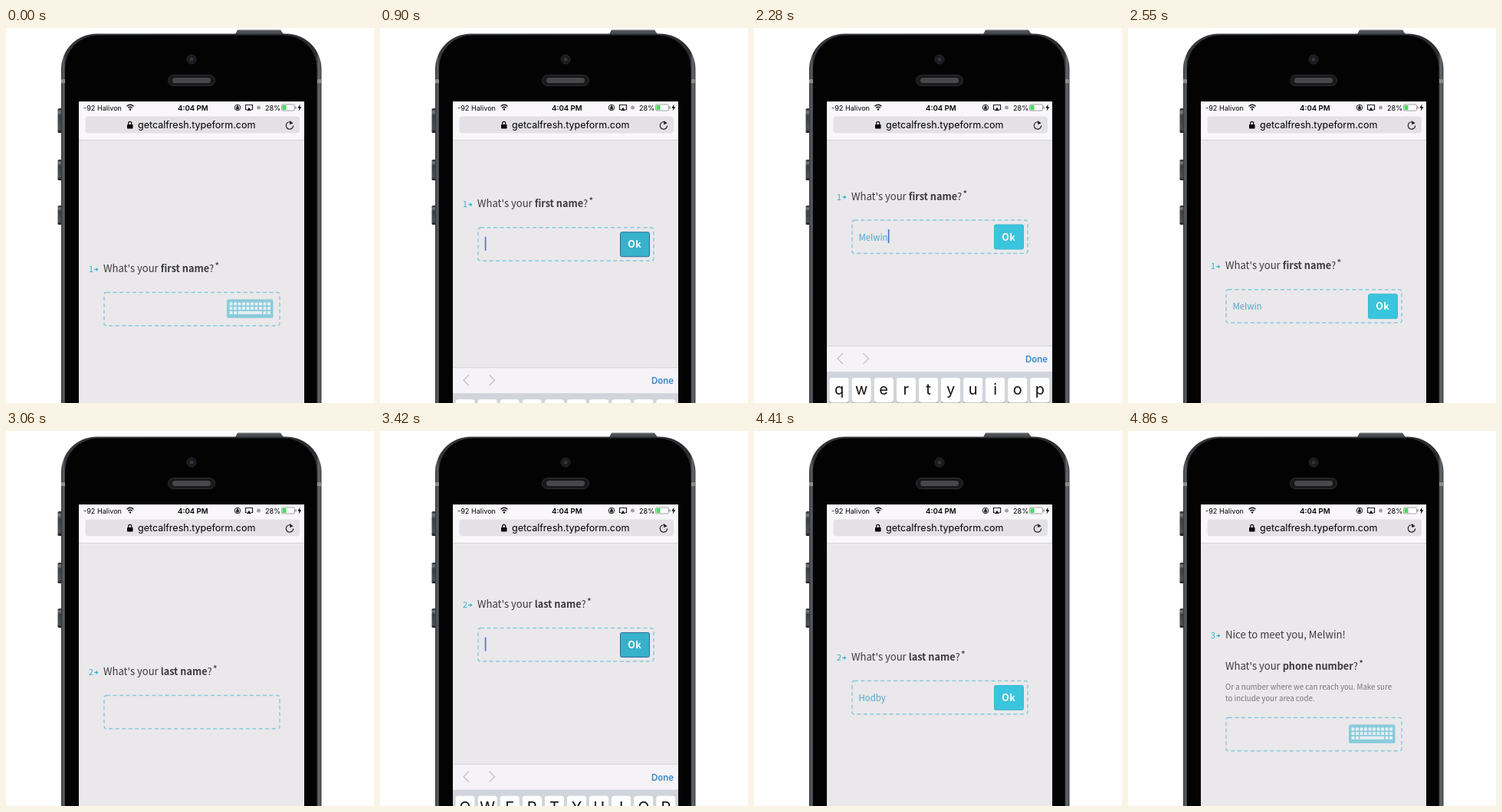
Write an HTML page that moves like this. It is 480 px wide and 490 px high and loops after 4.89 s.

```html
<!DOCTYPE html>
<html lang="en">
<head>
<meta charset="utf-8">
<title>Mobile form</title>
<style>
  html, body { margin: 0; width: 100%; height: 100%; overflow: hidden; background: #fff; }
  svg { display: block; width: 480px; height: 490px; }
  text { font-family: Inter, "Liberation Sans", sans-serif; white-space: pre; }
  .form text { font-family: "Noto Sans CJK JP", "Noto Sans CJK SC", "Noto Sans CJK", "Noto Sans", sans-serif; }
  .title { font-size: 13.1px; fill: #3b3a3d; }
  .title .strong { font-size: 12.7px; font-weight: 600; }
  .hint { font-size: 9.7px; fill: #77757a; }
  .num { font-size: 10.8px; fill: #35b0ca; }
  .entry { font-size: 11.4px; fill: #4ba9cb; }
  .ok { font-size: 12.4px; font-weight: 700; fill: #fff; letter-spacing: .5px; text-anchor: middle; }
  .key { font-size: 20px; fill: #111; text-anchor: middle; }
</style>
</head>
<body>
<svg viewBox="0 0 480 490">
  <defs>
    <linearGradient id="edge">
      <stop offset="0" stop-color="#2e3135"/>
      <stop offset=".008" stop-color="#5d6166"/>
      <stop offset=".016" stop-color="#33363a"/>
      <stop offset=".98" stop-color="#2b2d31"/>
      <stop offset=".99" stop-color="#686b70"/>
      <stop offset="1" stop-color="#3a3d41"/>
    </linearGradient>
    <linearGradient id="metal" x2="0" y2="1">
      <stop offset="0" stop-color="#26282b"/>
      <stop offset=".15" stop-color="#777a7f"/>
      <stop offset=".3" stop-color="#3b3e42"/>
      <stop offset=".85" stop-color="#4d5054"/>
      <stop offset="1" stop-color="#151618"/>
    </linearGradient>
    <clipPath id="screen"><rect x="95" y="96" width="294" height="394"/></clipPath>
    <clipPath id="page"><rect x="95" y="147" width="294" height="343"/></clipPath>
  </defs>

  <g id="phone">
    <path d="M299 8L302 2.5H358L362 8Z" fill="#4b4e52"/>
    <path d="M303 3H357" stroke="#85888c"/>
    <g fill="url(#metal)">
      <rect x="67.5" y="105" width="7" height="32" rx="1.5"/>
      <rect x="67.5" y="172" width="7" height="27" rx="1.5"/>
      <rect x="67.5" y="232" width="7" height="25" rx="1.5"/>
    </g>
    <rect x="72" y="7.5" width="339.5" height="600" rx="46" fill="url(#edge)"/>
    <path d="M72 67h5v5h-5zM406 67h5.5v5H406z" fill="#8b8d90"/>
    <rect x="77" y="9.5" width="328.5" height="600" rx="43" fill="#030304"/>
    <circle cx="242" cy="41" r="6" fill="#1a1a1d" stroke="#29292c"/>
    <circle cx="242" cy="41" r="2.6" fill="#34343c"/>
    <rect x="211.5" y="61.5" width="61" height="14" rx="7" fill="#19191b" stroke="#303033"/>
    <rect x="217" y="65" width="50" height="7" rx="3.5" fill="#48484b"/>
  </g>

  <rect x="95" y="96" width="294" height="394" fill="#eae8eb"/>
  <g id="form" class="form" clip-path="url(#page)"></g>

  <g id="chrome">
    <rect x="95" y="96" width="294" height="50.5" fill="#f9f7fa"/>
    <path d="M95 146.5H389" stroke="#d5d3d7"/>
    <text x="101" y="107.5" font-size="9.1">-92 Halivon</text>
    <g fill="none" stroke="#111" stroke-width="1.4">
      <path d="M157.5 102.2Q162 98.4 166.500 102.2M159.300 104.400Q162 102.100 164.700 104.400"/>
    </g>
    <circle cx="162" cy="106.400" r="1.200"/>
    <text x="224" y="107.500" font-size="9.600" font-weight="600">4:04 PM</text>
    <circle cx="302" cy="104" r="3.800" fill="none" stroke="#222"/>
    <path d="M300.300 103.500h3.400v2.700h-3.400zM301 103.500v-1a1 1 0 0 1 2 0v1" fill="#222" stroke="#222" stroke-width=".5"/>
    <path d="M314 106.500H312.500V100.500H321.500V106.500H320" fill="none" stroke="#222" stroke-width="1.200"/>
    <path d="M317 103.800L320.300 108H313.700Z" fill="#222"/>
    <circle cx="329.500" cy="104" r="2.500" fill="#a3a1a6"/>
    <text x="338" y="107.500" font-size="9.100">28%</text>
    <rect x="359.500" y="100" width="17" height="8" rx="1.500" fill="#fff" stroke="#8c8b90" stroke-width=".8"/>
    <rect x="360.500" y="101" width="5" height="6" fill="#4cd964"/>
    <path d="M378 102.500v3" stroke="#8c8b90" stroke-width="1.400"/>
    <path d="M383.700 99.500L380.500 104.500H382.600L381.700 108.500L385.300 103.300H383.100Z"/>

    <rect x="103.500" y="115.500" width="279.500" height="22" rx="4" fill="#e3e1e5"/>
    <rect x="158" y="126" width="7.500" height="5.500" rx=".8"/>
    <path d="M159.700 126V124.300a2 2 0 0 1 4 0V126" fill="none" stroke="#000" stroke-width="1.200"/>
    <text x="172" y="131" font-size="12.500">getcalfresh.typeform.com</text>
    <path d="M373.400 124.200A4.700 4.700 0 1 0 374.700 127.500" fill="none" stroke="#222" stroke-width="1.200"/>
    <path d="M370.200 121L374.600 124.400L370.200 126.300Z" fill="#222"/>
  </g>

  <g clip-path="url(#screen)"><g id="keyboard"></g></g>
</svg>

<script>
const LOOP = 4890;
const LIFT = 94.5;        // page rise while the keyboard is open
const KEYBOARD = 205;     // keyboard travel
const PAGE = 350;         // distance between questions
const ROW = 'qwertyuiop';
const $ = id => document.getElementById(id);

// Each question: when it is focused, typed into, confirmed and left.
const questions = [
  { label: 'first name', enter: null, icon: -100, focus: 640, rise: 710, dur: 360,
    text: 'Melwin', keys: [1300, 1480, 1640, 1780, 1920, 2060],
    press: 2210, drop: 2340, leave: 2610 },
  { label: 'last name', enter: 2610, icon: null, focus: 3210, rise: 3220, dur: 340,
    text: 'Hodby', keys: [3590, 3680, 3760, 3830, 3900],
    press: 4140, drop: 4240, leave: 4450 },
  { label: 'phone number', enter: 4450, icon: 4710, hello: 'Nice to meet you, Melwin!',
    hint: ['Or a number where we can reach you. Make sure', 'to include your area code.'] }
];

const ramp = (t, start, dur) => Math.min(1, Math.max(0, (t - start) / dur));
const easeOut = p => 1 - (1 - p) ** 3;
const easeInOut = p => p * p * (3 - 2 * p);
const show = (el, on) => el.setAttribute('visibility', on ? 'visible' : 'hidden');
const moveTo = (el, y) => el.setAttribute('transform', `translate(0 ${y.toFixed(2)})`);

function keyboardIcon(y) {
  let out = `<rect x="288" y="${y}" width="60.500" height="24.500" rx="2.500" fill="#8bcbdb"/>`;
  const cap = (x, row, w) =>
    `<rect x="${x}" y="${y + 4 + row * 5.800}" width="${w}" height="4" rx=".6" fill="#e4eef2"/>`;
  for (let i = 0; i < 10; i++) out += cap(291.500 + i * 5.500, 0, 4);
  for (let i = 0; i < 10; i++) out += cap(291.500 + i * 5.500, 1, 4);
  for (const x of [291.500, 297, 335.500, 341]) out += cap(x, 2, 4);
  return out + cap(302.500, 2, 31.500);
}

function questionMarkup(q, i) {
  const top = q.hello ? 374 : 345;
  const base = q.hello ? 312 : 319;
  const numY = q.hello ? 271 : 319;
  const hints = (q.hint || []).map((s, k) =>
    `<text class="hint" x="127" y="${338 + k * 15}">${s}</text>`).join('');
  return `
    <text class="num" x="108" y="${numY}">${i + 1}</text>
    <path d="M115 ${numY - 4}h2.500v-2l3 2.500l-3 2.500v-2h-2.500z" fill="#35b0ca"/>
    ${q.hello ? `<text class="title" x="127" y="271">${q.hello}</text>` : ''}
    <text class="title" x="127" y="${base}">What's your <tspan class="strong">${q.label}</tspan>?<tspan dx="1" dy="-3">*</tspan></text>
    ${hints}
    <rect x="128" y="${top + .5}" width="229" height="43.500" rx="3" fill="none"
      stroke="#86cad9" stroke-width="1.400" stroke-dasharray="5 3.500"/>
    <g class="icon">${keyboardIcon(top + 9.500)}</g>
    <g class="active">
      <text class="entry" x="136.500" y="${top + 27}"></text>
      <rect class="caret" y="${top + 12.500}" width="1.600" height="18" fill="#4673c8"/>
      <rect class="button" x="313.500" y="${top + 6.500}" width="38" height="32" rx="2"/>
      <text class="ok" x="332.300" y="${top + 27}">Ok</text>
    </g>`;
}

function keyCenter(i) { return 111 + i * 29.100; }

function keyboardMarkup() {
  let out = `
    <rect x="95" y="415" width="294" height="34" fill="#f5f3f7"/>
    <path d="M95 415.500H389" stroke="#d3d1d6"/>
    <path d="M116 425L109 432L116 439M142.500 425L149.500 432L142.500 439" fill="none" stroke="#c4c3c9" stroke-width="1.400"/>
    <text x="354" y="437" font-size="11.400" font-weight="600" fill="#3c86c6">Done</text>
    <rect x="95" y="449" width="294" height="200" fill="#d1d5db"/>`;
  [...ROW].forEach((c, i) => {
    const x = keyCenter(i);
    out += `<rect x="${x - 12.700}" y="458" width="25.400" height="32.500" rx="4" fill="#8b8e94"/>
      <rect x="${x - 12.700}" y="457" width="25.400" height="32.500" rx="4" fill="#fff"/>
      <text class="key letter" x="${x}" y="479">${c}</text>`;
  });
  return out + `<g id="popup">
      <path d="M-19 421q0-5 5-5h28q5 0 5 5v24q0 5-3 7t-3.300 6v27q0 4-4 4h-17.400q-4 0-4-4v-27q0-4-3.300-6t-3-7z" fill="#fff" stroke="#b4b7bd" stroke-width=".7"/>
      <text class="key" y="447" style="font-size:28px"></text>
    </g>`;
}

const views = questions.map((q, i) => {
  const g = document.createElementNS('http://www.w3.org/2000/svg', 'g');
  g.innerHTML = questionMarkup(q, i);
  $('form').append(g);
  const part = name => g.querySelector('.' + name);
  return { g, icon: part('icon'), active: part('active'), entry: part('entry'),
           caret: part('caret'), button: part('button') };
});
$('keyboard').innerHTML = keyboardMarkup();
const letters = [...document.querySelectorAll('.letter')];
const popup = $('popup');

function setEntry(view, text) {
  if (view.typed === text) return;
  view.typed = text;
  view.entry.textContent = text;
  const width = text ? view.entry.getComputedTextLength() : 0;
  view.caret.setAttribute('x', 136.800 + width);
}

function drawQuestion(q, view, t) {
  const inP = q.enter === null ? 1 : easeInOut(ramp(t, q.enter, 340));
  const outP = q.leave ? easeInOut(ramp(t, q.leave, 340)) : 0;
  const lift = q.focus ? easeOut(ramp(t, q.rise, q.dur)) - easeInOut(ramp(t, q.drop, 240)) : 0;
  moveTo(view.g, PAGE * (1 - inP - outP) - LIFT * lift);
  view.g.setAttribute('opacity', (.25 + .75 * (inP - outP)).toFixed(3));
  show(view.g, inP > 0 && outP < 1);

  const focused = q.focus && t >= q.focus;
  view.active.style.display = focused ? '' : 'none';
  const iconOpacity = q.icon === null || focused ? 0 : ramp(t, q.icon, 100);
  view.icon.setAttribute('opacity', iconOpacity);
  if (!focused) return;

  setEntry(view, q.text.slice(0, q.keys.filter(k => t >= k).length));
  view.caret.setAttribute('opacity', t < q.drop ? 1 : 0);
  const pressed = t >= q.press;
  view.button.setAttribute('fill', pressed ? '#3bc4dd' : '#37b2ca');
  view.button.setAttribute('stroke', pressed ? '#3bb8d0' : '#2b6a9c');
}

function drawKeyboard(t) {
  const q = t < questions[0].leave ? questions[0] : questions[1];
  const up = easeOut(ramp(t, q.rise + 17, q.dur)) - easeInOut(ramp(t, q.drop, 260));
  moveTo($('keyboard'), KEYBOARD * (1 - up));

  const shift = t < q.keys[0];
  letters.forEach((el, i) => {
    el.textContent = shift ? ROW[i].toUpperCase() : ROW[i];
  });

  const hit = q.keys.findIndex((k, i) => i > 0 && t >= k - 20 && t < k + 50);
  const col = hit < 0 ? -1 : ROW.indexOf(q.text[hit]);
  show(popup, col >= 0);
  if (col >= 0) {
    popup.setAttribute('transform', `translate(${keyCenter(col)} 0)`);
    popup.lastElementChild.textContent = ROW[col];
  }
}

function draw(t) {
  questions.forEach((q, i) => drawQuestion(q, views[i], t));
  drawKeyboard(t);
}

const start = performance.now();
function tick() {
  draw((performance.now() - start) % LOOP);
  requestAnimationFrame(tick);
}
tick();
</script>
</body>
</html>
```
